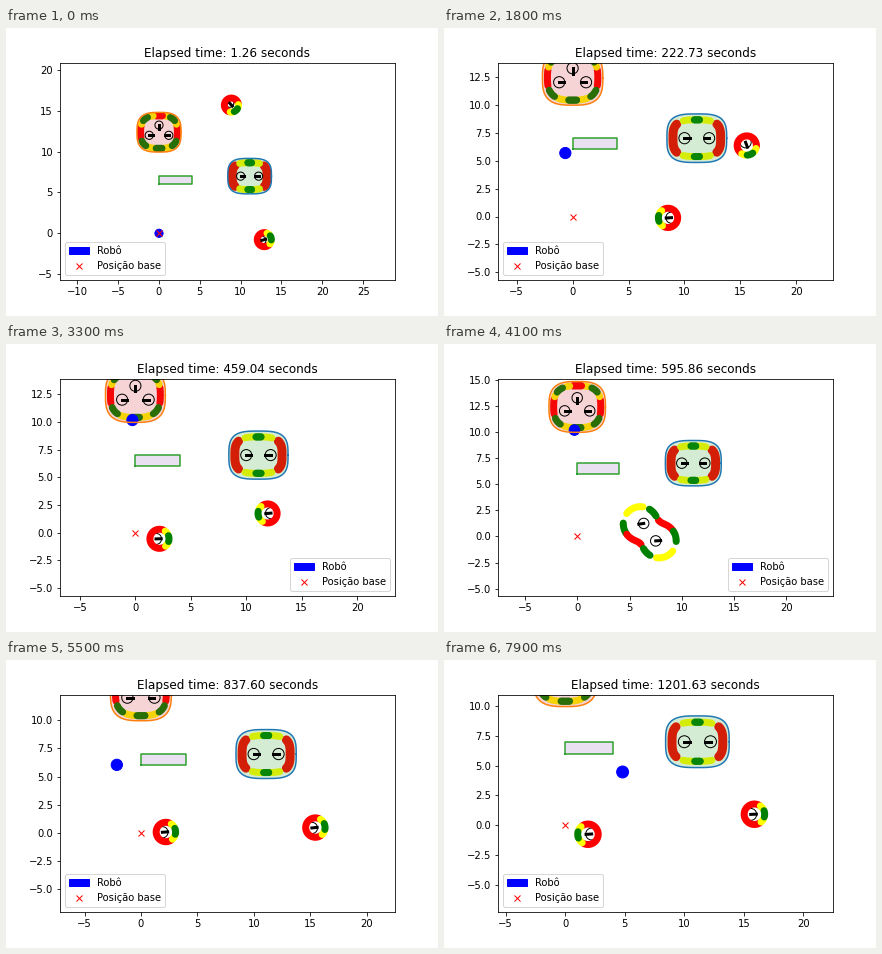
Animation, 432 px wide and 288 px high, one loop 8 s. Source, as a matplotlib script:

```python
import numpy as np
import matplotlib.pyplot as plt
from matplotlib.animation import FuncAnimation
from matplotlib.patches import Circle, Patch

plt.rcParams.update({"font.family": "DejaVu Sans", "font.size": 10,
                     "figure.subplot.bottom": 0.125})
FRAMES = 80

# Key moments shared by the clock, the camera and the walkers
KEYS = [0, 12, 25, 41, 55, 65, 79]
CLOCK = [1.26, 137.45, 322.22, 595.86, 837.60, 975.26, 1201.63]

# Camera: pixel position of the data origin and pixels per unit
ORIGIN_X = [153.0, 131.2, 125.6, 133.2, 134.9, 121.2, 121.2]
ORIGIN_Y = [205.3, 191.5, 185.0, 192.4, 173.0, 165.1, 165.1]
SCALE = [8.165, 10.74, 11.71, 10.46, 11.28, 11.91, 11.91]

# Routes are polylines; travel is the distance covered at the key moments
ROBOT_OUT = [(0, 0), (-0.25, 3.87), (-1.14, 7.87), (-0.27, 10.16)]
ROBOT_BACK = [(-0.27, 10.16), (-2.18, 5.94), (0.21, 4.34), (4.82, 4.46)]
WALKERS = [
    ([(8.66, 15.93), (14.35, 9.64), (17.1, 2.2), (6.36, 1.24), (-0.3, -0.1),
      (9.43, 0.63), (15.63, 0.9)],
     [0, 8.5, 15.4, 27.2, 36.2, 43.7, 49.9]),
    ([(12.6, -0.86), (17, 0.35), (0, -0.6), (7.5, -0.43), (16.5, 0.6),
      (10.23, -0.2), (2.18, -0.75)],
     [0, 8.4, 17.8, 29.1, 36.8, 44.5, 52.5]),
]
AHEAD = 0.31    # personal space is shifted towards the heading

fig, ax = plt.subplots(figsize=(6, 4), dpi=72)


def mirror(arcs):
    return arcs + [(180 - b, 180 - a, c) for a, b, c in arcs]


def turn(arcs, deg):
    return [(a + deg, b + deg, c) for a, b, c in arcs]


# start and end angle of each coloured arc
SOLO = [(62, 298, "red"), (30, 52, "yellow"), (-52, -30, "yellow"),
        (-18, 18, "green")]
HALF = [(-28, 22, "red"), (72, 108, "yellow"), (36, 58, "green"),
        (128, 150, "green")]
MEETING = HALF + turn(HALF, 180)
SIDES = mirror([(-35, 35, "red")])
PAIR = mirror([(52, 78, "yellow"), (-78, -52, "yellow"),
               (82, 98, "green"), (-98, -82, "green")])
TRIO = mirror([(78, 102, "red"), (-18, 18, "red"), (62, 70, "yellow"),
               (24, 28, "yellow"), (-76, -54, "yellow"),
               (36, 52, "green"), (-46, -28, "green"), (-100, -80, "green")])


def key(values, k):
    return np.interp(k, KEYS, values)


def along(route, dist):
    """Point at a given distance along a polyline."""
    p = np.array(route, float)
    s = np.append(0, np.cumsum(np.hypot(*np.diff(p, axis=0).T)))
    return np.array([np.interp(dist, s, c) for c in p.T])


def unit(deg):
    t = np.radians(deg)
    return np.array([np.cos(t), np.sin(t)])


def angle(v):
    return np.degrees(np.arctan2(v[1], v[0]))


def rounded(cx, cy, a, b, n=2):
    """Superellipse as a function of the polar angle in degrees."""
    def curve(deg):
        c, s = unit(deg)
        r = (abs(c / a) ** n + abs(s / b) ** n) ** (-1 / n)
        return cx + r * c, cy + r * s
    return curve


def merged(p, q, radius=1.65):
    """Smooth outline around two nearby points."""
    mid = (p + q) / 2
    radii = np.linspace(0, 4, 400)

    def curve(deg):
        d = unit(deg).T
        pts = mid + d[:, None] * radii[:, None]
        field = sum(np.exp(-((pts - o) ** 2).sum(-1)) for o in (p, q))
        inside = field > np.exp(-radius ** 2)
        r = np.where(inside, radii, 0).max(axis=1)
        return mid[0] + r * d[:, 0], mid[1] + r * d[:, 1]
    return curve


def band(curve, arcs, z, lw=7):
    for a, b, color in arcs:
        ax.plot(*curve(np.linspace(a, b, 40)), color=color, lw=lw,
                solid_capstyle="round", zorder=z)


def person(pos, deg, z):
    ax.add_patch(Circle(pos, 0.5, fill=False, ec="black", lw=1, zorder=z))
    ax.plot(*np.transpose([pos, pos + 0.47 * unit(deg)]),
            color="black", lw=3, zorder=z + 0.6)


def region(x, y, edge, fill):
    ax.fill(x, y, color=fill, alpha=0.2, lw=0, zorder=1.2)
    ax.plot(x, y, color=edge, lw=1.5, zorder=2)


def scenery():
    full = np.linspace(0, 360, 200)
    ring = rounded(11.1, 7, 2.13, 1.64, 3.2)
    band(ring, SIDES, 1, lw=9)
    band(ring, PAIR, 1)
    region(*rounded(11.1, 7, 2.67, 2.17, 3.3)(full), "tab:blue", "tab:green")
    band(rounded(0, 12.4, 2.25, 2, 2.8), TRIO, 1)
    region(*rounded(0, 12.38, 2.7, 2.43, 3)(full), "tab:orange", "tab:red")
    region([0, 4, 4, 0, 0], [6, 6, 7, 7, 6], "tab:green", "tab:purple")
    for x, y, deg in [(10, 7, 0), (12.2, 7, 180), (-1.2, 12, 0),
                      (1.2, 12, 180), (0, 13.25, -90)]:
        person(np.array([x, y]), deg, 2.1)


def walkers(k):
    spots, fronts, headings = [], [], []
    for route, travel in WALKERS:
        d = key(travel, k)
        pos = along(route, d)
        deg = angle(along(route, d + 0.4) - along(route, d - 0.4))
        person(pos, deg, 2.2)
        spots.append(pos)
        fronts.append(pos + AHEAD * unit(deg))
        headings.append(deg)
    if np.hypot(*(spots[0] - spots[1])) < 3:
        axis = angle(fronts[0] - fronts[1])
        band(merged(*fronts), turn(MEETING, axis - 105), 2.5)
    else:
        for front, deg in zip(fronts, headings):
            band(rounded(*front, 0.86, 0.86), turn(SOLO, deg), 2.5)


def robot(k):
    if k < 41:
        return along(ROBOT_OUT, 0.318 * k)
    return along(ROBOT_BACK, 0.323 * (k - 41))


def draw(k):
    ax.cla()
    scenery()
    walkers(k)
    ax.add_patch(Circle(robot(k), 0.5, color="blue", zorder=1.5))
    base, = ax.plot(0, 0, "rx", zorder=2)

    x0, y0, s = key(ORIGIN_X, k), key(ORIGIN_Y, k), key(SCALE, k)
    ax.set_xlim((54 - x0) / s, (388.8 - x0) / s)
    ax.set_ylim((y0 - 252) / s, (y0 - 34.56) / s)
    ax.set_title(f"Elapsed time: {key(CLOCK, k):.2f} seconds")
    ax.legend([Patch(color="blue"), base], ["Robô", "Posição base"],
              loc="lower right" if 31 <= k < 49 else "lower left")
    return []


anim = FuncAnimation(fig, draw, frames=FRAMES, init_func=lambda: [],
                     interval=100, repeat=True, repeat_delay=0)
plt.show()
```
